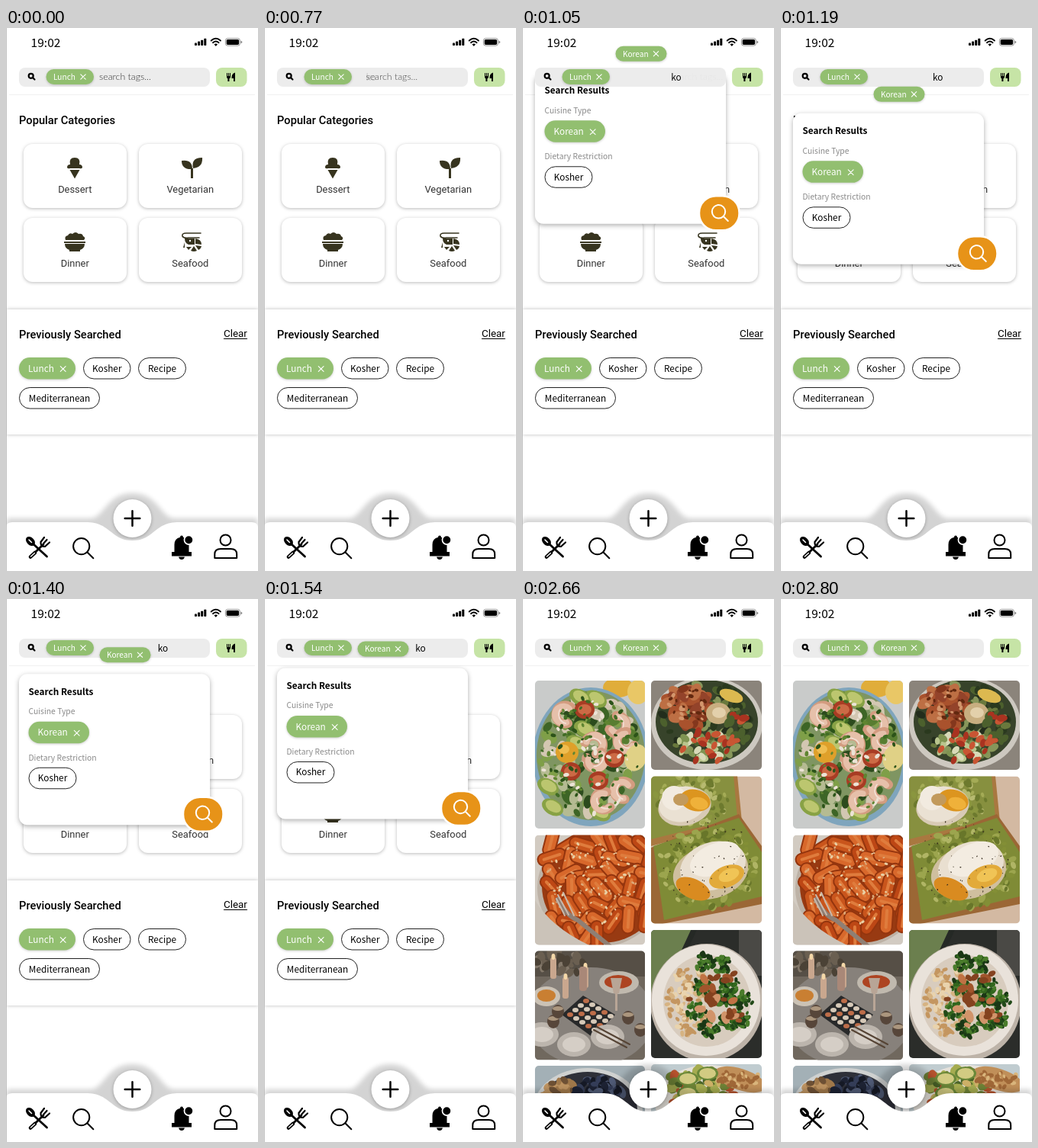
These frames come from a looping animation (330x712 px, 4200 ms). An HTML page:

```html
<!DOCTYPE html>
<html lang="en">
<head>
<meta charset="utf-8">
<title>Recipe tag search</title>
<style>
  html, body { margin: 0; width: 100%; height: 100%; overflow: hidden; background: #fff; }
  svg { display: block; width: 330px; height: 712px; }
  text { font: 500 11.8px "Noto Sans CJK JP", "Noto Sans CJK SC", "Noto Sans", sans-serif; white-space: pre; }
  .head { font: 500 14.7px Roboto, sans-serif; }
  .label { font: 400 12.9px Roboto, sans-serif; fill: #333; text-anchor: middle; }
  .link { font: 400 13.4px Roboto, sans-serif; }
  .clock { font-size: 15.6px; font-weight: 400; }
  .small { font-size: 10.1px; font-weight: 400; }
  .note { font-size: 10.35px; font-weight: 400; fill: #8a8a8a; }
  .hint { font: 300 12.3px Lato, sans-serif; fill: #333; }
  .bold { font-weight: 700; }
  .regular { font-weight: 400; }
  .mid { text-anchor: middle; }
  .card { fill: #fff; filter: drop-shadow(0 1.5px 2px rgba(0,0,0,.27)); }
  .soft { filter: drop-shadow(0 1px 1.5px rgba(0,0,0,.2)); }
  .line { fill: none; stroke: #000; stroke-linecap: round; stroke-linejoin: round; }
  .art { filter: blur(.5px); }
</style>
</head>
<body>
<svg id="stage" viewBox="0 0 330 712"></svg>
<script>
const LOOP = 4200, STEP = 70, START = 700, OPEN = 770, SETTLED = 1820, RESULTS = 2660, TRAVEL = 830;
const GREEN = '#92bf70', BROWN = '#37341f';

let seed = 7;
const rnd = () => (seed = seed * 16807 % 2147483647) / 2147483647;
const pick = list => list[Math.floor(rnd() * list.length)];

// Drawing helpers
const text = (x, y, s, cls = '', fill = '') =>
  `<text x="${x}" y="${y}" class="${cls}" ${fill && `style="fill:${fill}"`}>${s}</text>`;
const box = (x, y, w, h, r, attrs) => `<rect x="${x}" y="${y}" width="${w}" height="${h}" rx="${r}" ${attrs}/>`;
const disc = (x, y, rx, ry, fill, turn = 0) =>
  `<ellipse cx="${x}" cy="${y}" rx="${rx}" ry="${ry}" fill="${fill}" transform="rotate(${turn} ${x} ${y})"/>`;
const shape = (d, fill) => `<path d="${d}" fill="${fill}"/>`;
const line = (d, width, color = '#000') => `<path class="line" d="${d}" stroke-width="${width}" style="stroke:${color}"/>`;
const cross = (x, y, r) => line(`M${x - r} ${y - r}l${2 * r} ${2 * r}m0 ${-2 * r}l${-2 * r} ${2 * r}`, 1.1, '#fff');
const lens = (x, y, r, tail, width, color) => {
  const e = r * .72;
  return `<circle class="line" cx="${x}" cy="${y}" r="${r}" stroke-width="${width}" style="stroke:${color}"/>` +
    line(`M${x + e} ${y + e}l${tail} ${tail}`, width, color);
};

const tag = (x, w, name) =>
  box(x, 54, w, 20, 10, `fill="${GREEN}" class="soft"`) + text(x + 9.5, 67.8, name, 'small', '#fff') + cross(x + w - 14, 64, 3.2);
const pill = (x, y, w, name) =>
  box(x, y, w, 28.5, 14.2, `fill="${GREEN}" class="soft"`) + text(x + 12, y + 18.6, name, '', '#fff') + cross(x + w - 16.3, y + 15, 3.4);
const outline = (x, y, w, name) =>
  box(x, y, w, 27.5, 13.7, 'fill="#fff" stroke="#222"') + text(x + w / 2, y + 18, name, 'mid');

// Food pictures
const blobs = (x, y, rx, ry, n, size, colors) => Array.from({ length: n }, () => {
  const a = rnd() * 2 * Math.PI, d = Math.sqrt(rnd()), s = size * (.6 + rnd() * .7);
  return disc(x + rx * d * Math.cos(a), y + ry * d * Math.sin(a), s, s * .65, pick(colors), rnd() * 180);
}).join('');
const at = (points, draw) => points.map(([x, y]) => draw(x, y)).join('');
let photoId = 0;
const photo = (x, y, w, h, back, art) => {
  const id = 'photo' + photoId++;
  return `<clipPath id="${id}">${box(x, y, w, h, 5, '')}</clipPath>
    <g clip-path="url(#${id})">${box(x, y, w, h, 0, `fill="${back}"`)}<g class="art">${art}</g></g>`;
};
const shrimp = (x, y) => `<g transform="rotate(${rnd() * 360} ${x} ${y})">` +
  line(`M${x - 11} ${y + 6}a12 12 0 1 1 20 5`, 12, '#d39c80') +
  line(`M${x - 10} ${y + 4}a11 11 0 1 1 18 4`, 8, '#e6c0aa') +
  line(`M${x - 11} ${y + 3}a12 12 0 0 1 18 -7`, 2, '#f2ded2') + '</g>';

const salad = () => photo(17, 107, 144, 194, '#c9cbca',
  disc(126, 116, 20, 13, '#e0ad3a') + disc(152, 122, 14, 16, '#e9c766') +
  disc(90, 207, 76, 91, '#7fa5bd') + disc(90, 205, 71, 85, '#7f9562') +
  blobs(88, 205, 64, 78, 130, 9, ['#3d6526', '#587d31', '#7f9f48', '#b5bb92', '#d3c7b2', '#2c4b1d']) +
  at([[97, 131], [76, 129], [82, 171], [34, 246], [72, 190], [40, 273], [102, 280]], (x, y) =>
    disc(x, y, 15, 10, '#88a245', 30) + disc(x + 1, y - 1, 11, 7, '#bcc66f', 30)) +
  at([[54, 152], [95, 189], [127, 165], [98, 212], [130, 251], [105, 266], [135, 188]], shrimp) +
  disc(59, 201, 15, 14, '#dfa02a') + disc(55, 197, 7, 6, '#efbd50') + disc(149, 208, 14, 18, '#e0d186', 20) +
  at([[100, 238], [64, 226], [121, 209], [82, 145]], (x, y) => disc(x, y, 13, 12, '#a83c24') + disc(x, y, 9, 7, '#cc6a45')) +
  blobs(90, 205, 64, 78, 120, 3, ['#2c5319', '#5f8531', '#ece3d6', '#416c25']));

const bowl = () => photo(169, 107, 145, 117, '#8b847b',
  disc(242, 163, 73, 61, '#cdc8c0') + disc(242, 161, 67, 55, '#37432a') +
  blobs(242, 160, 61, 49, 100, 6, ['#2a391e', '#4c602d', '#69793d', '#232d1c', '#87965a']) +
  blobs(219, 141, 30, 25, 42, 9, ['#84371d', '#a9522d', '#bd6f44', '#93432a']) +
  blobs(219, 141, 28, 23, 30, 3, ['#62280f', '#d3966c']) +
  disc(274, 127, 16, 8, '#dcb950', 20) + disc(257, 150, 16, 14, '#c8ae80') + disc(258, 149, 9, 7, '#e3d0ab') +
  blobs(239, 191, 38, 20, 34, 6, ['#b9c58d', '#d8dab8', '#7f9452']) +
  blobs(244, 193, 42, 20, 18, 6, ['#a93320', '#c95533']) + blobs(282, 165, 14, 22, 12, 6, ['#a93320', '#c95533', '#4c602d']));

const pasta = () => photo(17, 309.5, 144, 144, '#d2cbc2',
  disc(102, 379, 82, 77, '#bdb2a6') + disc(105, 376, 79, 75, '#983a12') +
  Array.from({ length: 46 }, (_, i) => {
    const x = 38 + i % 7 * 20 + rnd() * 8, y = 318 + Math.floor(i / 7) * 20 + rnd() * 8, a = rnd() * Math.PI;
    const dx = 11 * Math.cos(a), dy = 11 * Math.sin(a), d = `M${x - dx} ${y - dy}L${x + dx} ${y + dy}`;
    return line(d, 18, '#94350e') + line(d, 14, pick(['#c9551c', '#d8682b', '#bd4715'])) + line(d, 4, '#df7c3d');
  }).join('') +
  blobs(92, 372, 62, 56, 110, 2, ['#e9cfa4', '#dca878']) +
  shape('M17 395Q38 430 88 454H17Z', '#cbc3b9') + line('M47 394Q58 415 73 421L116 456', 6, '#8f7f74') +
  line('M47 388l14 26m-7-29l14 30m-23-22l11 22', 2, '#c9b8aa'));

const toast = () => photo(169, 232.5, 145, 193, '#d3b9a2',
  shape('M169 232H282L288 292L169 324Z', '#a97840') + shape('M169 232H277L282 287L169 315Z', '#87903f') +
  shape('M169 326L284 282L314 324V400L184 426H169Z', '#9b6735') + shape('M172 324L284 287L314 332V390L186 421Z', '#7f8b36') +
  blobs(222, 263, 48, 36, 90, 5, ['#6d7a2e', '#a4ab56', '#8a963f', '#b7ba70']) +
  blobs(242, 352, 64, 54, 150, 5, ['#68762a', '#9ca54e', '#838f36', '#b0b565']) +
  disc(213, 272, 35, 25, '#d8cab5', -12) + disc(210, 269, 31, 23, '#eae1d3', -12) + disc(199, 261, 16, 16, '#f2ebe0') +
  disc(227, 264, 20, 14, '#dc951f', 15) + disc(232, 268, 12, 8, '#efb13a', 15) + disc(208, 263, 10, 8, '#c29a5c') +
  disc(247, 358, 50, 35, '#cfbf9f', -15) + disc(250, 350, 44, 31, '#e9dfd0', -18) + disc(253, 341, 35, 20, '#f3ece1', -24) +
  disc(224, 380, 24, 13, '#d98b20', 25) + disc(268, 364, 24, 14, '#e2aa3a', -22) + disc(271, 362, 14, 8, '#f0c456', -22) +
  blobs(242, 342, 58, 62, 70, .9, ['#33291c']));

const table = () => photo(17, 461.5, 144, 143, '#70685e',
  box(17, 461, 144, 34, 0, 'fill="#564f46"') + disc(90, 548, 83, 65, '#87817b') +
  blobs(52, 478, 38, 14, 24, 8, ['#4b4236', '#6a5f51', '#83786a']) +
  disc(127, 503, 26, 15, '#c0b9ae') + disc(126, 502, 18, 9, '#ad4422') + disc(32, 521, 18, 13, '#cbc2b5') + disc(32, 520, 12, 8, '#c97f32') +
  at([[41, 479], [57, 505], [83, 491]], (x, y) => box(x - 4, y - 9, 8, 28, 3, 'fill="#c9a78e"') + disc(x, y - 10, 2.5, 4, '#f4d8a8')) +
  box(75, 482, 10, 32, 4, 'fill="#a98878"') +
  shape('M52 545L80 520L122 545L93 575Z', '#28292a') +
  Array.from({ length: 20 }, (_, i) => {
    const u = i % 5, v = Math.floor(i / 5);
    return disc(63 + u * 8 + v * 7, 545 + u * 5 - v * 6, 4, 3, i % 3 ? '#d6c9b8' : '#bd6d49');
  }).join('') +
  at([[68, 584], [112, 574], [26, 571]], (x, y) => disc(x, y, 22, 16, '#bcb5ad') + disc(x, y, 15, 10, '#d5cec6')) +
  line('M94 565L137 588M98 561L141 584', 2, '#564435') +
  at([[41, 554], [139, 549], [47, 541], [155, 565]], (x, y) => disc(x, y, 8, 9, '#57463a') + disc(x, y - 4, 7, 3, '#ab967e')) +
  shape('M116 497h15l-4 20h-7zM122 516h3v24h-3z', '#b8a596'));

const broccoli = () => photo(169, 434, 145, 168, '#2b2d2a',
  shape('M169 434H223L204 482L169 519Z', '#6b7f4e') + line('M225 434L199 490', 7, '#252925') +
  box(284, 434, 30, 60, 0, 'fill="#4a4945"') + disc(242, 529, 74, 77, '#bdb3a8') + disc(241, 526, 71, 73, '#e9e2da') + disc(242, 527, 57, 60, '#d8ccbe') +
  blobs(220, 528, 30, 46, 130, 4, ['#d6b382', '#c49660', '#e9d3ad']) +
  at([[238, 476], [261, 480], [238, 507], [228, 540], [245, 563], [272, 553], [289, 527], [288, 552], [264, 522], [272, 505]],
    (x, y) => blobs(x, y, 13, 11, 32, 4, ['#224a19', '#32661d', '#4a7c2b', '#1a3715'])) +
  blobs(255, 526, 36, 46, 28, 7, ['#a1552c', '#c07244', '#84421f', '#d1946a']));

const berries = () => photo(17, 612, 144, 70, '#a3b0b6',
  disc(86, 671, 72, 56, '#cfd1d0') + disc(86, 670, 65, 50, '#2e3039') +
  blobs(49, 648, 22, 19, 40, 6, ['#a0784a', '#bd9361', '#6d5034']) +
  blobs(100, 646, 32, 19, 50, 6, ['#1d2233', '#343d58', '#151925', '#4f5a75']));

const platter = () => photo(169, 610, 145, 72, '#c0ccd0',
  disc(246, 660, 72, 49, '#e6e2db') + blobs(236, 643, 50, 27, 75, 8, ['#6d8136', '#a5ac50', '#b6522d', '#cdb067', '#4a6428']) +
  disc(286, 630, 35, 14, '#c08f59', 18) + blobs(284, 630, 28, 11, 30, 4, ['#9f6737', '#d9b57c']) +
  at([[217, 629], [243, 622], [217, 648]], (x, y) => disc(x, y, 14, 9, '#6a8839') + disc(x, y, 11, 7, '#d2cb82')));

// Interface parts
const card = (x, y, name, icon) => box(x, y, 135, 84, 12, 'class="card"') + text(x + 67.3, y + 63.5, name, 'label') + icon;
const cone = shape('M80 183q0-4 4-4q-2-9 6-9t6 9q4 0 4 4q-1 2-4 1H84q-3 1-4-1ZM83.5 186H96.5L90 197.5Z', BROWN);
const sprout = shape('M230 174Q244 172 244 185Q230 186 230 174ZM245 184Q242 170 257 170Q258 183 245 184ZM242 184h3v13h-3z', BROWN);
const rice = shape('M78 278q-2-5 3-6q2-4 6-2q4-4 8 0q5-1 6 3q4 2 1 5ZM76 280h28v2H76zM77 283h26q0 6-6 8v2H83v-2q-6-2-6-8Z', BROWN);
const prawn = line('M255 269H236q-6 0-5 4q2 3 8 2h14', 1.6, BROWN) +
  shape('M234 276h13v8h-8q-5-2-5-8ZM248 276q8 1 8 8l-8-1zM248 285l8 1q-1 4-4 5zM246 286l4 6q-4 2-8 0zM236 287h7l-4 4zM234 281v7h-2z', BROWN) +
  disc(241, 279, 1.2, 1.2, '#fff');

const browse = `
  ${text(17, 126.3, 'Popular Categories', 'head')}
  ${card(23, 152, 'Dessert', cone)}${card(174, 152, 'Vegetarian', sprout)}
  ${card(23, 249, 'Dinner', rice)}${card(174, 249, 'Seafood', prawn)}
  <rect x="1" y="369" width="329" height="164" fill="#fff" style="filter:drop-shadow(0 0 2.5px rgba(0,0,0,.27))"/>
  ${text(17, 406.5, 'Previously Searched', 'head')}${text(285, 405.3, 'Clear', 'link')}
  <path d="M285 407.5H316" stroke="#000"/>
  ${pill(17, 432, 74, 'Lunch')}${outline(101.5, 432.5, 61.5, 'Kosher')}
  ${outline(173.5, 432.5, 62, 'Recipe')}${outline(17.5, 471.5, 105, 'Mediterranean')}`;

const panel = `
  <rect x="17" y="89" width="250" height="198" rx="11" fill="#fff" style="filter:drop-shadow(0 2px 3px rgba(0,0,0,.32))"/>
  ${text(29.5, 116.3, 'Search Results', 'bold')}${text(29.5, 141.8, 'Cuisine Type', 'note')}
  ${pill(29.5, 151.5, 79.5, 'Korean')}${text(29.5, 202.3, 'Dietary Restriction', 'note')}
  ${outline(30, 212, 62, 'Kosher')}
  ${box(232, 250.5, 52.5, 45, 22, 'fill="#e79318" stroke="#fff" stroke-width="2.5"')}
  ${lens(257.5, 271, 8.7, 6, 2, '#fff')}`;

const search = `
  ${box(17, 52, 250, 25, 8, 'fill="#ececec"')}${lens(32.7, 62.8, 3, 2.6, 2.2, '#000')}
  ${tag(52.5, 62.5, 'Lunch')}
  ${box(275, 52, 40.5, 25, 8, 'fill="#c6e4a6"')}
  ${shape('M289 59h1v4h1v-4h1v4h1v-4h1v5q0 2-1.6 2.4V70h-2v-3.6Q289 66 289 64Z', '#000')}
  ${shape('M300 58.5V70h-2v-4h-2.5Q295 60 300 58.5Z', '#000')}
  <g id="typing">${text(122, 68.3, 'search tags...', 'hint')}</g><g id="typed">${text(122, 68.7, 'ko', 'regular')}</g>`;

const status = `
  ${text(32.5, 24.6, '19:02', 'clock')}
  ${[0, 1, 2, 3].map(i => box(247 + i * 4.1, 19.5 - i * 1.9, 3, 3.5 + i * 1.9, .8, '')).join('')}
  ${line('M268.7 16.5Q274.8 11 280.9 16.5M271 19.2Q274.8 15.8 278.6 19.2', 1.9)}
  ${shape('M272.5 21.3Q274.8 19.6 277.1 21.3L274.8 24Z', '#000')}
  ${box(287.4, 13.6, 19, 9.6, 2.8, 'fill="none" stroke="#777" stroke-width=".8"')}${box(288.7, 14.9, 16.4, 7, 1.7, '')}
  ${shape('M307.6 16.7q1.6.3 1.6 1.8t-1.6 1.8z', '#777')}`;

const utensils = line('M35 676L53.5 693', 2.8) + disc(32, 673, 7, 4.8, '#000', 45) + line('M30 671l3.5 3.5', 1.6, '#fff') +
  line('M49 677L32 693.5', 2.8) + line('M38 688L32 693.5', 4.6) + line('M37.5 688.5L32.5 693', 1.3, '#fff') +
  line('M50 668L45.5 674Q45 680 51 680L57 674.5M53.5 671l-4.5 5', 2.2);

const nav = `
  <path d="M1 643H110C129 643 131 610 165.5 610S202 643 221 643H329V674H1Z" opacity=".17" style="filter:blur(3px)"/>
  ${shape('M0 654Q1 648 8 648H104C122 648 129 654 138 661C147 669 155 672 165.5 672S184 669 193 661C202 654 209 648 227 648H322Q329 648 330 654V712H0Z', '#fff')}
  <circle cx="165.5" cy="643" r="25" class="card"/>${line('M155.7 643h19.6m-9.8-9.8v19.6', 2.5)}
  ${utensils}${lens(98.7, 679.6, 10.6, 8, 2, '#000')}
  ${shape('M230 665.5q2 0 2 2.3q7.5 1.7 7.5 9.7v9.5h3.5v5.5H217V687h3.5v-9.5q0-8 7.5-9.7q0-2.3 2-2.3ZM226 693.5h8q-1 3.5-4 3.5t-4-3.5Z', '#000')}
  <circle cx="239.3" cy="671.3" r="5.8" stroke="#fff" stroke-width="1.7"/>
  <circle class="line" cx="287.5" cy="671.5" r="7" stroke-width="2"/>
  ${line('M273.3 695V690Q273.3 683 281 683H294.5Q302.2 683 302.2 690V695Z', 2)}`;

const stage = document.getElementById('stage');
stage.innerHTML = `
  <rect width="330" height="712" fill="#fff"/>
  <path d="M4 87.5H326" stroke="#f1f1f1"/>
  <g id="browse">${browse}</g>
  <g id="results">${salad()}${bowl()}${pasta()}${toast()}${table()}${broccoli()}${berries()}${platter()}</g>
  <g id="panel">${panel}</g>
  <g>${search}</g><g>${status}</g>
  <g id="chip">${tag(122.5, 67, 'Korean')}</g>
  <g>${nav}</g>
  <path d="M.4 0V712" stroke="#aaa" stroke-width=".8"/>`;
const part = Object.fromEntries([...stage.querySelectorAll('g[id]')].map(g => [g.id, g]));
const show = (g, on) => g.setAttribute('display', on ? 'inline' : 'none');
const move = (g, x, y) => g.setAttribute('transform', `translate(${x} ${y})`);

// Damped spring with a slight overshoot
function spring(s) {
  const decay = 6.95, w = 6.12;
  return 1 - Math.exp(-decay * s) * (Math.cos(w * s) + decay / w * Math.sin(w * s));
}

function progress(t) {
  if (t < OPEN) return 0;
  return t < SETTLED ? spring((t - START) / 1000) : 1;
}

function draw() {
  const t = Math.floor(performance.now() % LOOP / STEP) * STEP;
  const p = progress(t), done = t >= RESULTS, y = TRAVEL * (p - 1);
  show(part.browse, !done);
  show(part.results, done);
  show(part.panel, !done && p > 0);
  show(part.chip, p > 0);
  show(part.typing, !done);
  show(part.typed, !done);
  move(part.panel, 0, y);
  move(part.chip, 0, y);
  move(part.typing, 76 * p, 0);
  move(part.typed, 76 * p, 0);
  part.typing.setAttribute('opacity', Math.max(0, 1 - p));
  part.typed.setAttribute('opacity', Math.min(1, p));
  requestAnimationFrame(draw);
}
draw();
</script>
</body>
</html>
```
